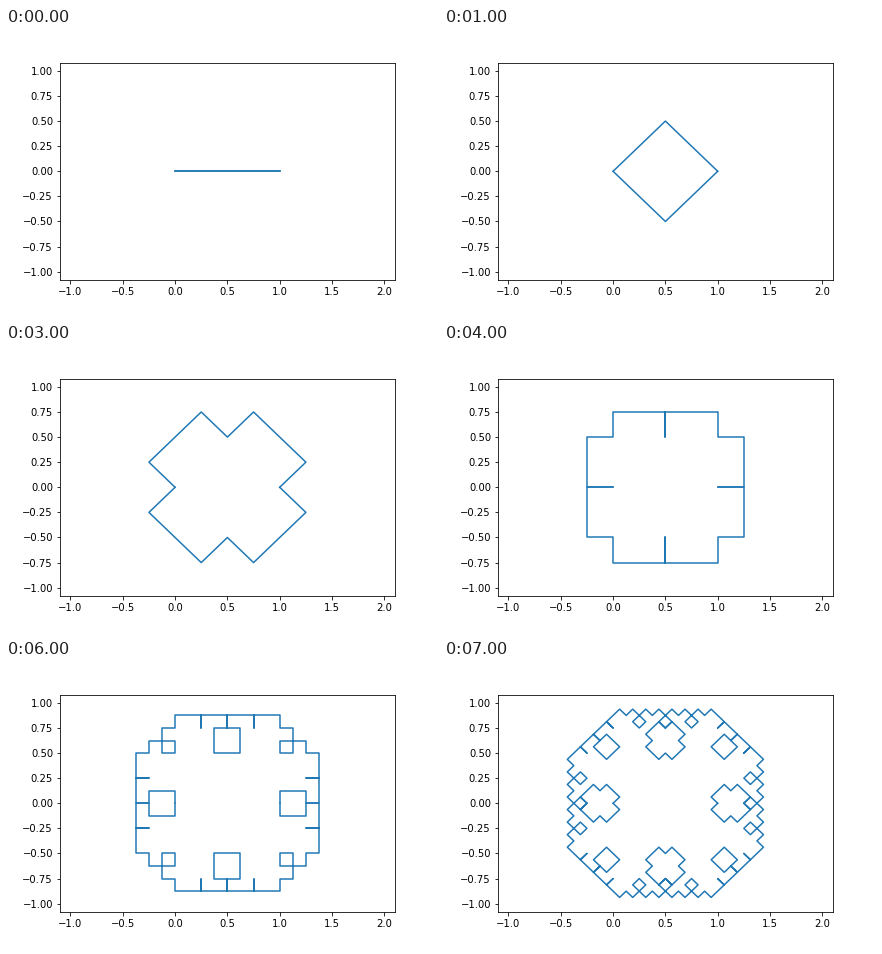
Recreate the animation shown at these times as a matplotlib script. Size 432 px wide and 288 px high, loop 8 s.

```python
import numpy as np
import matplotlib.pyplot as plt
from matplotlib.animation import FuncAnimation

LEVELS = 8


def c_curve(level):
    """Levy C curve over the segment 0..1 as complex points."""
    pts = np.array([0, 1], dtype=complex)
    for _ in range(level):
        a, b = pts[:-1], pts[1:]
        finer = np.empty(2 * len(pts) - 1, dtype=complex)
        finer[::2] = pts
        finer[1::2] = (a + b) / 2 + 1j * (b - a) / 2
        pts = finer
    return pts


fig, ax = plt.subplots(figsize=(6, 4), dpi=72)
fig.subplots_adjust(left=0.125, right=0.9, bottom=0.125, top=0.88)
ax.set_xlim(-1.1, 2.1)
ax.set_ylim(-1.0828, 1.0828)
upper, = ax.plot([], [], color="C0")
lower, = ax.plot([], [], color="C0")


def draw(level):
    pts = c_curve(level)
    upper.set_data(pts.real, pts.imag)
    lower.set_data(pts.real, -pts.imag)
    return upper, lower


anim = FuncAnimation(fig, draw, frames=LEVELS, interval=1000, repeat=True)
plt.show()
```
